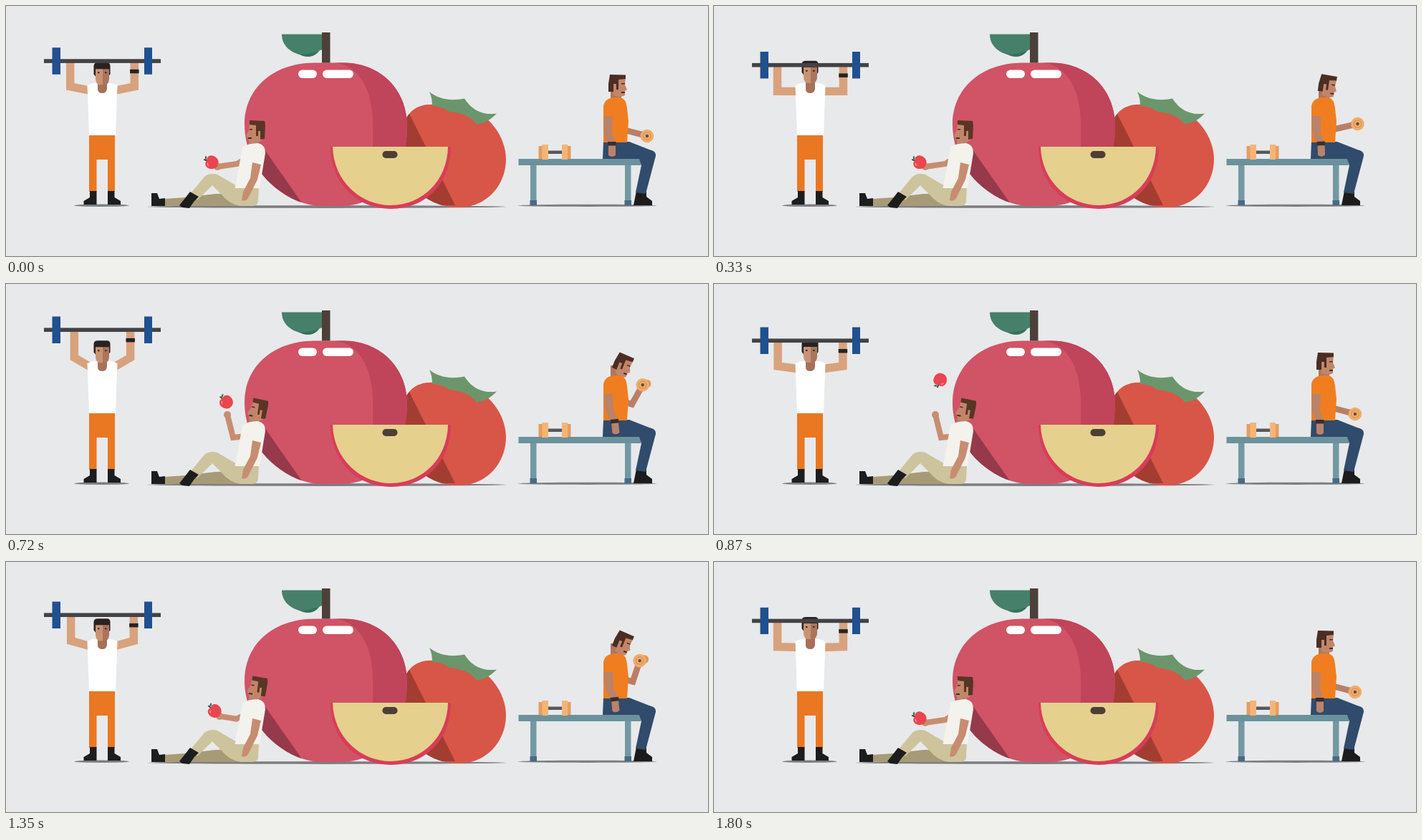
These frames come from a looping animation (980x350 px, 1.83 s). An HTML page:

```html
<!DOCTYPE html>
<html lang="en">
<head>
<meta charset="utf-8">
<title>Fitness and fruit</title>
<style>
html, body { margin: 0; width: 100%; height: 100%; overflow: hidden; background: #e8e9eb; }
svg { display: block; width: 980px; height: 350px; }
.limb { fill: none; stroke-linejoin: miter; }
</style>
</head>
<body>
<svg viewBox="0 0 980 350" xmlns="http://www.w3.org/2000/svg">
<defs>
  <path id="tomatoShape" d="M590 138C568 139 553 155 552 185C548 248 586 282 632 282C670 282 698 252 698 214C698 184 675 150 640 141C622 137 604 137 590 138Z"/>
  <path id="appleShape" d="M430 79.500H472C524 80 560 118 560 168C560 225 530 279 468 280H442C394 281 333 233 333 166C333 116 372 80 430 79.500Z"/>
  <path id="boot" d="M117 259H126.500V278H108.500V273L117 268Z"/>
  <clipPath id="inTomato"><use href="#tomatoShape"/></clipPath>
  <clipPath id="inApple"><use href="#appleShape"/></clipPath>
</defs>

<!-- ground shadows -->
<g fill="#7d7d80">
  <ellipse cx="133.500" cy="279.300" rx="38.500" ry="1.700"/>
  <ellipse cx="448" cy="281" rx="251" ry="1.900"/>
  <ellipse cx="811.500" cy="279.300" rx="97" ry="1.600"/>
</g>

<!-- tomato -->
<use href="#tomatoShape" fill="#d85647"/>
<path clip-path="url(#inTomato)" fill="#a33d32" d="M560 145L627 279H550V145Z"/>
<path fill="#6b966c" d="M591 120C602 129 618 134 640 129.500C648 142 662 154 685 150.500C676 160 666 165 657 165.500C649 154 634 149 619 148C610 141 601 140 595 140C595 133 594 126 591 120Z"/>

<!-- apple -->
<use href="#appleShape" fill="#d15366"/>
<g clip-path="url(#inApple)">
  <path fill="#c0445a" d="M456 79C496 82 512 122 512 165V205L500 285H570V75Z"/>
  <path fill="#96394b" d="M356 194L414 277L380 295L330 230Z"/>
</g>
<g fill="#fff">
  <rect x="408" y="89.500" width="26" height="11.500" rx="5.700"/>
  <rect x="442" y="89.500" width="43" height="11.500" rx="5.700"/>
</g>
<path fill="#357259" d="M408 67C420 74 436 73 441 54Z"/>
<path fill="#47806a" d="M385 39.500H441V61C432 65 422 67 410 68C395 64 385 54 385 39.500Z"/>
<rect x="441" y="37" width="11.500" height="42.500" fill="#4d3f3a"/>

<!-- slice -->
<path fill="#d93d58" d="M453 197H621C621 250 584 284 537 284C490 284 453 248 453 197Z"/>
<path fill="#e5d08e" d="M456 197H617C616 246 580 279 537 279C494 279 457 244 456 197Z"/>
<rect x="525.500" y="203" width="21" height="10" rx="4.800" fill="#4e3f36"/>

<!-- weightlifter -->
<g class="limb" stroke="#d8a27d" stroke-width="11.500">
  <path id="liftL"/>
  <path id="liftR" transform="translate(269) scale(-1 1)"/>
</g>
<rect id="band" width="12.500" height="5.500" fill="#252424"/>
<path fill="#ea7722" d="M116 180H152V260H142V215H126.500V260H116Z"/>
<g fill="#1d1d1d">
  <use href="#boot"/>
  <use href="#boot" transform="translate(268.500) scale(-1 1)"/>
</g>
<path fill="#fff" d="M113.500 111L121 108H147L155.500 111L153 181H116Z"/>
<path fill="#a77059" d="M128 106H141V116Q140 122 134.500 122Q128 122 128 116Z"/>
<g id="liftHead">
  <path fill="#282220" d="M122.500 16V5Q122.500 0 128 0H141Q145.500 0 145.500 5V16L142 21H126Z"/>
  <path fill="#c99373" d="M125 9H135V31H129Q125 28 125 22Z"/>
  <path fill="#aa755d" d="M135 9H144V22Q144 28 140 31H135Z"/>
  <path fill="#3b2b26" d="M128 13H130.500V15H128ZM138 13H140.500V15H138Z"/>
</g>
<g id="barbell">
  <rect x="53" y="-2.800" width="163" height="5.600" fill="#434244"/>
  <path fill="#20508f" d="M64.500 -18.700H76V18.700H64.500ZM193 -18.700H204V18.700H193Z"/>
</g>

<!-- sitter -->
<path fill="#a79b77" d="M221 270L250 268L292 263L345 262V280H222Z"/>
<path fill="#1d1d1d" d="M203 262H211L214 270L222 269V280H203Z"/>
<path id="tossArm" class="limb" stroke="#c78d70" stroke-width="8" stroke-linejoin="round"/>
<circle id="tossHand" r="5" fill="#c78d70"/>
<path fill="#cdc39d" d="M258 262L277 239Q284 233 295 236L324 253H353L352 274Q351 280 342 280H327Q311 277 301 264L288 251L267 272Z"/>
<path fill="#1d1d1d" d="M242 279L250 269L257 260L269 267L263 273L256 283L246 282Z"/>
<path fill="#b47a60" d="M339 181H353V198H339Z"/>
<path fill="#f4f2ec" d="M330 198Q337 192 352 192Q362 194 362 206L354 255H319.500L325 226Z"/>
<path fill="#c78d70" d="M344 219L356 222L351 243L338 269Q335 274 329 272L331 260L341 241Z"/>
<g id="sitHead">
  <path fill="#c1866a" d="M340 165H358V188Q348 193 340 192L338 186L335 181L339 174Z"/>
  <path fill="#593526" d="M340 160L361 161L362 167L361 186L355 187V175H352V182H349V167L340 166Z"/>
  <path fill="#4a2a22" d="M340 172H344V173.500H340ZM338 184H343V186H338Z"/>
</g>
<g id="ball">
  <path d="M0 -7V-12" stroke="#403630" stroke-width="1.700"/>
  <path fill="#3c7058" d="M0 -9Q3 -13 6 -11Q4 -8 0 -9Z"/>
  <path fill="#e9464f" d="M0 -7.500C4 -10 9.300 -7 9.300 -1C9.300 5 5 9.500 0 9C-5 9.500 -9.300 5 -9.300 -1C-9.300 -7 -4 -10 0 -7.500Z"/>
  <path d="M-6 -3Q-5 -5 -3 -5.500" stroke="#f4a0a2" stroke-width="1.300" fill="none"/>
</g>

<!-- bench -->
<path fill="#7299a3" d="M732 222H740.500V274H732ZM864 222H872.500V274H864Z"/>
<path fill="#466b86" d="M731.500 272H741V279H731.500ZM863.500 272H873V279H863.500Z"/>
<rect x="715.500" y="214" width="171" height="9" fill="#6b929c"/>
<rect x="755" y="202.500" width="22" height="4.500" fill="#58585a"/>
<path fill="#e59e5f" d="M743.500 196H750V214H743.500ZM783 196H788.500V214H783Z"/>
<path fill="#f3b577" d="M748.500 194H757V215H748.500ZM776 194H784V215H776Z"/>

<!-- curler -->
<path id="curlArm" class="limb" stroke="#b97f66" stroke-width="8.500"/>
<circle id="curlHand" r="5" fill="#b97f66"/>
<g id="bell">
  <circle id="bellBack" r="6" fill="#dd9655"/>
  <circle r="9.300" fill="#f0ad6c"/>
  <circle r="5.300" fill="none" stroke="#dc985b" stroke-width="1.500"/>
  <circle r="2.200" fill="#6b4a38"/>
</g>
<path fill="#1d1c1c" d="M880 259L894 260L894 267L902 273V279H876Z"/>
<path fill="#304b6c" d="M834 190H870L898 201Q908 203 907 210L893 263L879 261L887 223L884 214H833Z"/>
<path fill="#b0775e" d="M844 114H859V131H844Z"/>
<path fill="#f07e20" d="M834 140Q836 129 849 128H858Q866 130 867 143L869 161L867 191H834Z"/>
<g id="sideArm">
  <path fill="#bb8268" d="M834.500 154H847L846 178L851 192V209Q846 213 841 209V195L835 178Z"/>
  <path fill="#35302f" d="M840 190H851.500V195.500H840Z"/>
</g>
<g id="curlHead">
  <path fill="#c1866a" d="M845 101H865L864 110L867 117L864 119V125Q857 129 848 125Z"/>
  <path fill="#4c2d23" d="M843 96L865 96.500V102L855 103V117H852V109H848V120H841V109Z"/>
  <path fill="#4a2a22" d="M859 108H864V109.500H859ZM859 120H864V122H859Z"/>
</g>
</svg>
<script>
const LOOP = 1830, STEP = 30, CYCLE = 840, APEX = 945;
const $ = id => document.getElementById(id);
const set = (id, attrs) => {
  for (const k in attrs) $(id).setAttribute(k, attrs[k]);
};
const clamp = u => Math.min(1, Math.max(0, u));
const mix = (a, b, u) => a + (b - a) * u;
const ramp = (from, to, t) => {
  const u = clamp((t - from) / (to - from));
  return u * u * (3 - 2 * u);
};

// Each press is a bell curve in time, one per cycle.
function lift(t) {
  const away = (t - 660 + 1.5 * CYCLE) % CYCLE - CYCLE / 2;
  const up = Math.exp(-((away / 158) ** 2));
  const y = mix(83, 61.3, up);
  const x = mix(88.5, 97, up ** 1.5);
  const d = `M119 ${mix(119.5, 116.5, up)}L${x} ${mix(120, 101, up ** 0.75)}V${y + 1}`;
  set("liftL", { d });
  set("liftR", { d });
  set("band", { x: 262.8 - x, y: y + 11.7 });
  set("liftHead", { transform: `translate(0 ${mix(76.5, 79.3, clamp(up * 5))})` });
  set("barbell", { transform: `translate(0 ${y})` });
}

// The forearm swings about an elbow that moves forward as it bends.
function curl(t) {
  const p = t < 1000 ? t : t - CYCLE;
  const bend = ramp(190, 580, p) - ramp(660, 870, p);
  const angle = mix(15, -80, bend) * Math.PI / 180;
  const ex = mix(865, 876, bend), ey = mix(174, 167, bend);
  const reach = r => [ex + r * Math.cos(angle), ey + r * Math.sin(angle)];
  const [hx, hy] = reach(25);
  const lean = ramp(0, 0.7, bend);
  set("curlArm", { d: `M854 ${ey - 6}L${ex} ${ey}L${hx} ${hy}` });
  set("curlHand", { cx: hx, cy: hy });
  set("bell", { transform: `translate(${reach(31)})` });
  set("bellBack", { cx: 7 * bend, cy: -2 * bend });
  set("sideArm", { transform: `rotate(${-6 * lean} 841 156)` });
  set("curlHead", { transform: `translate(${2 * lean} 0) rotate(${22 * lean} 850 126)` });
}

// The throw and the catch mirror each other around the apex.
function toss(t) {
  const release = 245, rest = 615, away = t - APEX;
  const raise = clamp((rest - Math.abs(away)) / (rest - release));
  const swing = raise ** 2.7;
  const hx = mix(295, 309, swing), hy = mix(225, 183, swing);
  let x = mix(287.5, 306, swing), y = mix(219, 172, swing);
  let angle = mix(-70, -35, raise);
  if (Math.abs(away) < release) {
    const u = away / release;
    x = mix(317, 306, u * u);
    y = mix(130, 172, u * u);
    angle -= 180 * (1 + u);
  }
  set("tossArm", { d: `M336 213L${mix(323, 317, swing)} ${mix(221, 215, swing)}L${hx} ${hy}` });
  set("tossHand", { cx: hx, cy: hy });
  set("ball", { transform: `translate(${x} ${y}) rotate(${angle})` });
  set("sitHead", { transform: `rotate(${9 * Math.sin(raise * Math.PI / 2)} 346 194)` });
}

const start = performance.now();
function draw(now) {
  const t = Math.floor(Math.max(0, now - start) % LOOP / STEP) * STEP;
  lift(t);
  curl(t);
  toss(t);
  requestAnimationFrame(draw);
}
draw(start);
</script>
</body>
</html>
```
